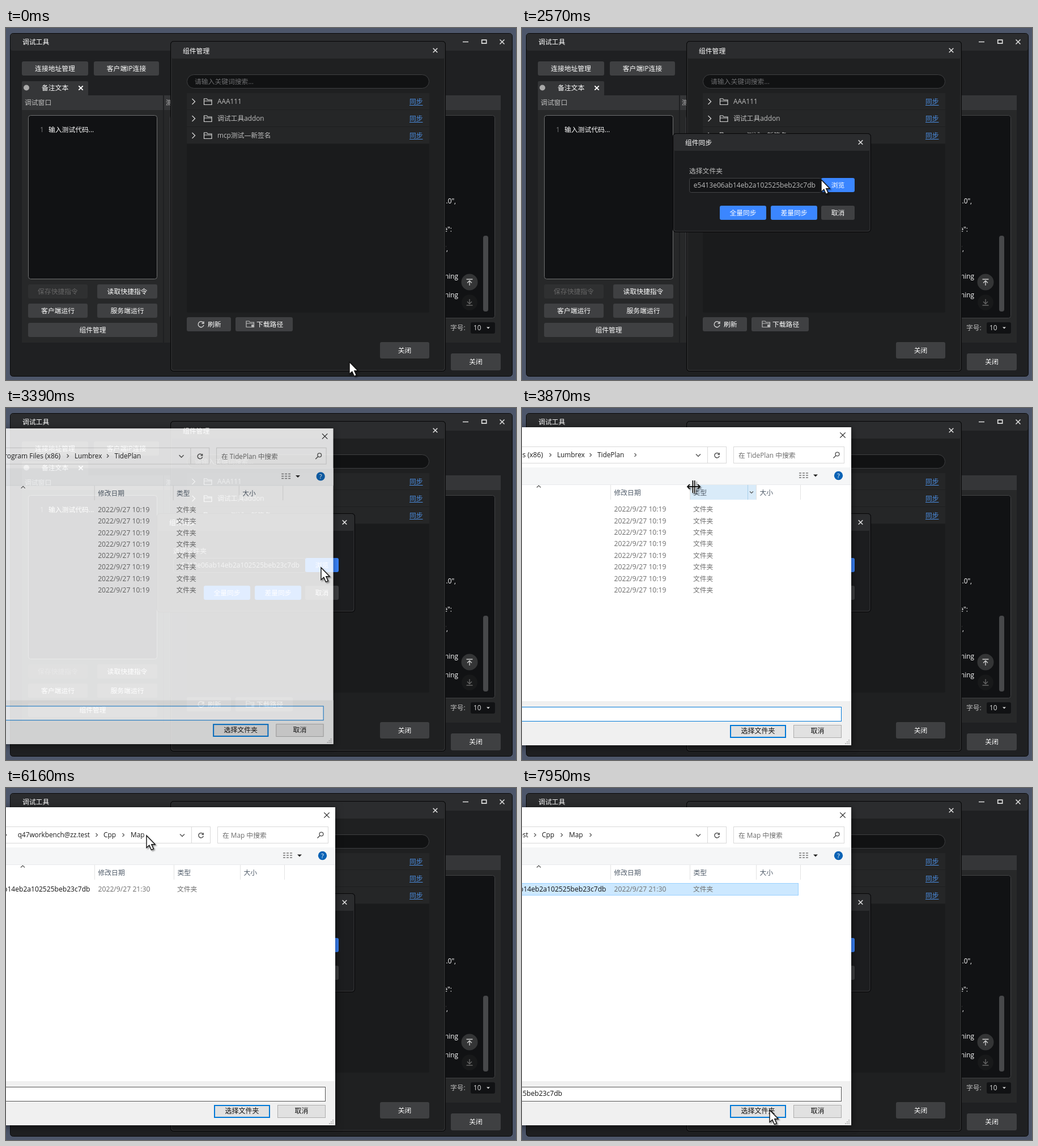
Animation, 900 px wide and 622 px high, one loop 8000 ms. Source, as an HTML page:

```html
<!DOCTYPE html>
<html lang="zh-CN">
<head>
<meta charset="utf-8">
<title>组件同步</title>
<style>
html, body { margin: 0; width: 100%; height: 100%; overflow: hidden; background: #4d566a; }
svg { display: block; width: 100vw; height: 100vh; }
text { font-family: "Open Sans", "Noto Sans CJK SC", "Noto Sans CJK", sans-serif; white-space: pre; }
#sheet { filter: drop-shadow(0 2px 7px rgba(0, 0, 0, .55)); }
#pointer { filter: drop-shadow(2px 2px 1px rgba(0, 0, 0, .4)); }
</style>
</head>
<body>
<svg id="stage" viewBox="0 0 900 622" preserveAspectRatio="none"></svg>
<script>
const LOOP = 8000, STEP = 70;
const BLUE = '#3b86ff', FOCUS = '#0078d7';
const HASH = 'e5413e06ab14eb2a102525beb23c7db';
const VENDOR = 'Lumbrex', APP = 'TidePlan', MAIL = 'q47workbench@zz.test';

// Drawing helpers: boxes by their corners, text by its vertical centre.
function box(x1, y1, x2, y2, fill, r = 0, stroke = '', extra = '') {
  const i = stroke ? .5 : 0;
  return `<rect x="${x1 + i}" y="${y1 + i}" width="${x2 - x1 - 2 * i}" height="${y2 - y1 - 2 * i}" rx="${r}" fill="${fill}"` +
    (stroke ? ` stroke="${stroke}"` : '') + ` ${extra}/>`;
}
function text(x, y, str, fill = '#fff', anchor = 'start', size = 11.8) {
  return `<text x="${x}" y="${y + 4.4}" fill="${fill}" text-anchor="${anchor}" font-size="${size}">${str}</text>`;
}
const path = (d, stroke, w = 1, fill = 'none') =>
  `<path d="${d}" stroke="${stroke}" stroke-width="${w}" fill="${fill}"/>`;
const disc = (x, y, r, fill) => `<circle cx="${x}" cy="${y}" r="${r}" fill="${fill}"/>`;
const group = (id, ...parts) => `<g id="${id}">${parts.join('')}</g>`;
const cross = (x, y, r, color, w = 1.6) =>
  path(`M${x - r} ${y - r}l${2 * r} ${2 * r}m0 ${-2 * r}l${-2 * r} ${2 * r}`, color, w);
const button = (x1, y1, x2, y2, label, fill = '#3f4042', color = '#fff') =>
  box(x1, y1, x2, y2, fill, 3) + text((x1 + x2) / 2, (y1 + y2) / 2, label, color, 'middle');
const chevron = (x, y, color = '#555') => path(`M${x - 1.5} ${y - 3}l3 3l-3 3`, color, 1.2);
const down = (x, y, r, color, w = 1.2) => path(`M${x - r} ${y - r / 2}l${r} ${r}l${r} ${-r}`, color, w);
const triangle = (x, y, r, color) => path(`M${x - r} ${y - r / 2}h${2 * r}l${-r} ${r}z`, 'none', 0, color);
const folder = (x, y, color) =>
  path(`M${x} ${y - 5}h5l1.5 2h7v8.5h-13.5zM${x} ${y - 1}h13.5`, color, 1.2);
const reload = (x, y, r, color, w = 1.3) =>
  path(`M${x + r * .8} ${y - r * .6}a${r} ${r} 0 1 0 ${r * .2} ${r * .9}M${x + r} ${y - r}v${r * .7}h${-r * .7}`, color, w);

function mainWindow() {
  const ink = '#111214';
  return [
    box(0, 0, 900, 622, '#4d566a'),
    box(7, 9, 894, 616, '#1f2022', 5, '#08090a'),
    box(8, 10, 893, 40, '#2b2c2e', 4),
    text(29, 25, '调试工具'),
    path('M806 24.5h10M839.7 21.2h8v6h-8z', '#ddd', 1.7), cross(875.5, 24.5, 4, '#ddd'),
    button(28, 59, 145, 84, '连接地址管理'), button(155, 59, 270, 84, '客户端IP连接'),
    box(28, 94, 145, 120, '#353638', 2), disc(36, 105.5, 5, '#a9a9a9'),
    text(63, 106, '备注文本'), cross(132, 106, 3.7, '#fff', 1.9),
    box(28, 145, 277, 556, '#272829'), box(279, 145, 873, 556, '#272829'),
    box(28, 119, 277, 145, '#353638'), box(279, 119, 873, 145, '#353638'),
    text(33, 132, '调试窗口', '#bdbdbd'), text(282, 132, '测试日志', '#bdbdbd'),
    box(39, 154, 267, 444, ink, 4, '#6f7071'),
    text(60, 180, '1', '#77787a'), text(75, 180, '输入测试代码...'),
    button(39, 453, 144, 478, '保存快捷指令', '#2f3031', '#666'),
    button(161, 453, 267, 478, '读取快捷指令'),
    button(39, 487, 144, 512, '客户端运行'), button(161, 487, 267, 512, '服务端运行'),
    button(39, 521, 267, 546, '组件管理'),
    box(289, 154, 863, 513, ink, 4, '#414244'),
    text(794, 306, '"version": "1.0.0",', '#fff', 'end'),
    text(787, 356, '"type":', '#fff', 'end'), text(780, 390, '"",', '#fff', 'end'),
    text(798, 439, 'warning', '#fff', 'end'), text(798, 472, 'warning', '#fff', 'end'),
    box(842, 367, 851, 501, '#47484a', 4),
    disc(818, 449, 14.5, '#343536'), disc(818, 485, 14, '#18191a'),
    path('M812.5 444h11M818 455v-8M814 450.5l4 -4l4 4', '#ccc', 1.4),
    path('M812.5 490h11M818 479v8M814 483.5l4 4l4 -4', '#666', 1.4),
    text(784, 530, '字号:', '#bdbdbd'), box(820, 520, 863, 540, ink, 3),
    text(825, 530, '10', '#ddd'), triangle(851, 530, 3, '#ddd'),
    button(785, 575, 873, 605, '关闭')
  ].join('');
}

function componentWindow() {
  const names = ['AAA111', '调试工具addon', 'mcp测试—新签名'];
  const rows = names.map((name, i) => {
    const y = 130 + i * 30;
    return box(319, y - 15, 747, y + 14.4, '#252627') +
      path(`M328.5 ${y - 5}l5 5l-5 5`, '#d0d0d0', 1.4) + folder(349.5, y, '#d8d8d8') +
      text(373, y, name, '#bdbdbd') + text(712, y, '同步', '#4c90e6') +
      path(`M712 ${y + 6.5}h23.5`, '#4c90e6');
  });
  return [
    box(290, 23, 776, 607, '#1f2021', 5, '#060607'),
    box(291.5, 24.5, 774.5, 605.5, 'none', 4, '#343537'),
    box(292, 25, 774, 54, '#2b2c2e', 3),
    text(312, 41, '组件管理'), cross(757.5, 39.5, 3.8, '#ddd'),
    box(319, 82, 747, 107, '#111213', 12, '#3e3f41'),
    text(333, 95, '请输入关键词搜索...', '#6c6d6f'),
    box(319, 115, 747, 503, '#1a1b1c', 3), ...rows,
    button(319, 511, 397, 536, ''), reload(344, 523.5, 5, '#ddd'), text(356, 523.5, '刷新'),
    button(405, 511, 506, 536, ''), folder(424, 523, '#bbb'), disc(435, 526, 2.2, '#bbb'),
    text(442, 523.5, '下载路径'),
    button(660, 555, 747, 584, '关闭')
  ].join('');
}

function syncWindow() {
  return group('sync',
    box(266, 186, 616, 361, '#1c1d1f', 5, '#060607'),
    box(267.5, 187.5, 614.5, 359.5, 'none', 4, '#343537'),
    box(268, 188, 614, 217, '#2b2c2e', 3),
    text(288, 203, '组件同步'), cross(597.5, 202, 3.8, '#ddd'),
    text(295, 253, '选择文件夹', '#bdbdbd'),
    box(295, 265, 529, 291, '#141517', 3, '#444547'),
    text(518, 278, HASH, '#bdbdbd', 'end', 12.1),
    box(528, 265, 587, 290, BLUE, 3, '', 'id="browse"'), text(557.5, 278, '浏览', '#fff', 'middle'),
    button(349, 314, 431, 339, '全量同步', BLUE), button(439, 314, 521, 339, '差量同步', BLUE),
    button(528, 314, 587, 339, '取消'));
}

function crumbs(id, list) {
  return group(id, ...list.map(([label, x, gap]) =>
    text(x, 83, label, '#1a1a1a') + (gap ? chevron(gap, 83) : '')));
}

function fileRow(y, date, name = '') {
  return text(148.5, y, name, '#111', 'end', 12.1) +
    text(162.5, y, date, '#6d6d6d', 'start', 12.2) + text(302, y, '文件夹', '#6d6d6d');
}

function fileDialog() {
  const grey = '#d9d9d9';
  const heads = [[156, '修改日期'], [296, '类型'], [413, '大小'], [491, '']];
  const oldRows = Array.from({ length: 8 }, (_, i) => fileRow(178.8 + i * 20.4, '2022/9/27 10:19'));
  const grip = [0, 1, 2].flatMap(i => [...Array(i + 1)].map((_, j) =>
    box(576 - 3 * j, 586 + 3 * i, 578 - 3 * j, 588 + 3 * i, '#bbb')));
  const content = group('content',
    box(-345, 105, 581, 135, '#f5f6f7'), path('M-345 135.5H581', '#e8eaec'),
    box(-200, 68, 361, 98, '#fff', 0, grey), path('M327.5 69v28', grey),
    box(373, 68, 569, 98, '#fff', 0, grey),
    down(311, 83.5, 4, '#555', 1.5),
    group('reload', reload(344, 83.5, 4.3, '#555', 1.5)),
    group('go', path('M338.5 83.5h10M344.5 79.5l4 4l-4 4', '#555', 1.4)),
    group('crumbsOld',
      text(96, 83, 'Program Files (x86)', '#1a1a1a', 'end', 12.1), chevron(109, 83),
      crumbs('oldTail', [[VENDOR, 121, 180], [APP, 192, 0]]), group('oldGap', chevron(259, 83))),
    group('pathOld', box(-200, 75, 45, 92, FOCUS),
      text(45, 83, `C:\\Program Files (x86)\\${VENDOR}\\${APP}`, '#fff', 'end')),
    group('pathNew', text(166, 83, `C:\\${APP}Download\\work\\${MAIL}\\Cpp\\Map`, '#111', 'end')),
    group('caret', box(167, 75, 168, 92, '#000')),
    group('crumbsNew', chevron(-.5, 83), text(148, 83, MAIL, '#1a1a1a', 'end'), chevron(160, 83),
      crumbs('newTail', [['Cpp', 172, 207], ['Map', 220, 0]]), group('newGap', chevron(258, 83))),
    group('findOld', text(382, 83.5, `在 ${APP} 中搜索`, '#6d6d6d')),
    group('findNew', text(382, 83.5, '在 Map 中搜索', '#6d6d6d')),
    `<circle cx="556.5" cy="81.5" r="3.4" fill="none" stroke="#555" stroke-width="1.4"/>`,
    path('M554 84l-4.5 4.5', '#555', 1.6),
    ...[0, 1, 2].map(i => path(`M489 ${115 + i * 4}h4m2 0h4m2 0h4`, '#777', 1.6)),
    triangle(518, 119.5, 4, '#222'),
    disc(558.5, 119.5, 7.7, '#0a62b5'), text(558.5, 119.5, '?', '#fff', 'middle', 11.5),
    group('headHover', box(297, 136, 413, 162, '#d9ebf9'),
      path('M398.5 136v26', '#a8cfeb'), down(405, 149, 3, '#555')),
    ...heads.map(([x, label]) => path(`M${x + .5} 136v26`, '#e2e2e2') +
      text(x + 6.5, 149.5, label, '#4f5b69')),
    path('M26 140.5l3.5 -3.5l3.5 3.5', '#555', 1.2),
    group('rowsOld', ...oldRows),
    group('rowHover', box(-180, 168, 487, 190, '#e5f3ff')),
    group('rowPicked', box(-180, 168, 488, 190, '#cce8ff', 0, '#99d1ff')),
    group('rowsNew', fileRow(178.8, '2022/9/27 21:30', HASH)),
    box(367, 560, 466, 583, '#e1e1e1'),
    `<rect x="368" y="561" width="97" height="21" fill="none" stroke="${FOCUS}" stroke-width="2"/>`,
    text(416.5, 571, '选择文件夹', '#111', 'middle', 12),
    box(479, 560, 564, 583, '#e1e1e1', 0, '#adadad'), text(521.5, 571, '取消', '#111', 'middle', 12),
    ...grip);
  return group('file',
    box(-345, 34, 581, 596, '#fff', 0, '', 'id="sheet"'),
    box(-345, 518, 581, 596, '#f0f0f0'),
    cross(566, 48, 4.7, '#222', 1.2), content,
    box(-260, 528, 564, 554, '#fff', 0, FOCUS, 'id="field"'),
    group('picked', text(71, 540, HASH, '#111', 'end', 12.1)));
}

function pointers() {
  return group('pointer',
    group('arrow', path('M0 0V21.5L4.8 17.2L8.4 25.4L12.4 23.7L8.8 15.8H15.2Z', '#111', 1.4, '#fff')),
    group('sizer',
      path('M-2 -11v22M2 -11v22M-11 0H11', '#fff', 3.6),
      path('M-1.7 -11v22M1.7 -11v22M-10 0H10M-7 -4l-4 4l4 4M7 -4l4 4l-4 4', '#111', 1.8)),
    group('beam', path('M-2 -12h4q1 0 1 2v20q0 2 -1 2h-4m10 0h-4q-1 0 -1 -2v-20q0 -2 1 -2h4', '#222', 1.5)));
}

document.getElementById('stage').innerHTML =
  mainWindow() + componentWindow() + syncWindow() + fileDialog() + pointers();
const parts = {};
document.querySelectorAll('[id]').forEach(el => parts[el.id] = el);
const show = (id, on) => parts[id].style.display = on ? '' : 'none';
const slide = (id, dx) => parts[id].setAttribute('transform', `translate(${dx} 0)`);

// Pointer moves: start, end, x, y. Each runs in steps of 70 ms.
const MOVES = [
  [70, 700, 720, 136], [900, 970, 720, 130],
  [2220, 2570, 528, 268], [2700, 2980, 556, 282],
  [3530, 3800, 320, 162], [3870, 3870, 303, 139], [3940, 4220, 248, 84],
  [6370, 6860, 205, 176], [7190, 7880, 433, 560], [7950, 7950, 437, 569]
];
function pointerAt(t) {
  let x = 606, y = 590;
  for (const [start, end, toX, toY] of MOVES) {
    if (t < start) break;
    const steps = Math.round((end - start) / STEP) + 1;
    const k = Math.min(1, (Math.floor((t - start) / STEP) + 1) / steps);
    const ease = k * k * (3 - 2 * k);
    x += (toX - x) * ease;
    y += (toY - y) * ease;
  }
  return [x, y];
}

// Opening of the file dialog: time, opacity, scale.
const OPENING = [[3250, .44, .971], [3320, .7, .984], [3390, .85, .9925], [3460, 1, 1]];

function draw(t) {
  const during = (a, b = LOOP) => t >= a && t < b;
  show('sync', t >= 1560);
  parts.browse.setAttribute('fill', during(2700, 3250) ? '#5d9cf5' : BLUE);

  show('file', t >= 3250);
  const [, alpha, scale] = OPENING.filter(s => s[0] <= t).pop() || OPENING[0];
  parts.file.setAttribute('opacity', alpha);
  parts.file.setAttribute('transform', `translate(118 315) scale(${scale}) translate(-118 -315)`);
  show('content', t >= 3320);
  show('headHover', during(3870, 3940));

  const fade = Math.max(0, Math.min(1, (Math.floor((t - 4480) / STEP) + 1) / 5));
  const mix = (a, b) => Math.round(a + (b - a) * fade);
  parts.field.setAttribute('stroke', `rgb(${mix(0, 85)},${mix(120, 85)},${mix(215, 85)})`);

  // The breadcrumbs move left once the folder has loaded and its arrow appears.
  show('crumbsOld', t < 4480);
  show('oldGap', t >= 3530);
  slide('crumbsOld', t >= 3530 ? -59 : 0);
  show('crumbsNew', t >= 6020);
  show('newGap', t >= 6230);
  slide('crumbsNew', t >= 6230 ? -137 : 0);

  show('pathOld', during(4480, 4960));
  show('pathNew', during(4960, 6020));
  show('caret', during(4960, 5490));
  show('go', during(4960, 6020));
  show('reload', !during(4960, 6020));
  show('findOld', t < 6020);
  show('findNew', t >= 6020);
  show('rowsOld', t < 6020);
  show('rowsNew', t >= 6090);
  show('rowHover', during(6720, 7120));
  show('rowPicked', t >= 7120);
  show('picked', t >= 7120);

  const [x, y] = pointerAt(t);
  const sizing = during(3870, 3940), typing = during(4480, 6020);
  show('sizer', sizing);
  show('beam', during(4480, 5160));
  show('arrow', !sizing && !typing);
  parts.pointer.setAttribute('transform', `translate(${Math.round(x)} ${Math.round(y)})`);
}

const begin = performance.now();
function tick() {
  draw((performance.now() - begin) % LOOP);
  requestAnimationFrame(tick);
}
tick();
</script>
</body>
</html>
```
